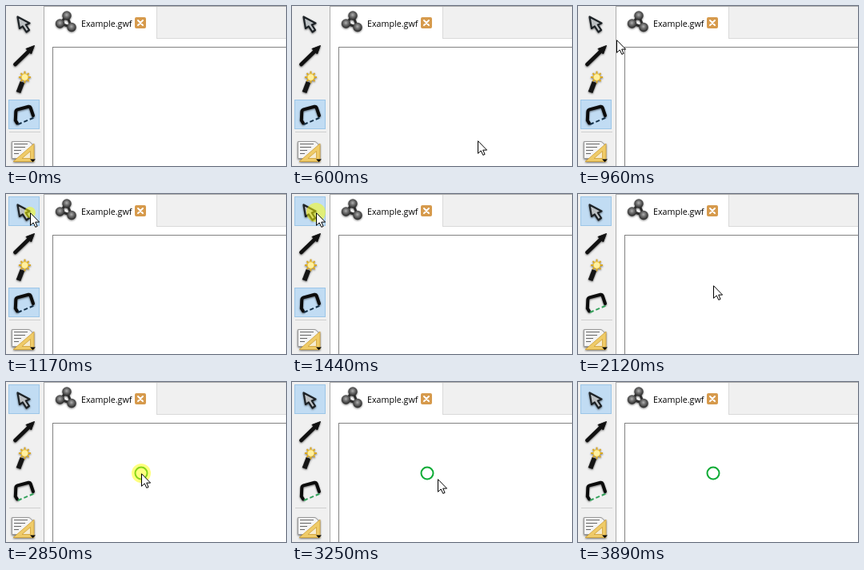
These frames come from a looping animation (350x200 px, 4.49 s). An HTML page:

```html
<!DOCTYPE html>
<html lang="en">
<head>
<meta charset="utf-8">
<title>Placing a node</title>
<style>
  html, body { margin: 0; width: 100%; height: 100%; overflow: hidden; background: #fff; }
  svg { display: block; width: 100%; height: 100%; }
  text { font: 10.7px "Open Sans", "Noto Sans", sans-serif; }
  .icon { filter: drop-shadow(.5px 1px 1.3px rgba(0, 0, 0, .55)); }
  .button { fill: #c1dcf3; stroke: #9cc6e8; }
  .crisp { shape-rendering: crispEdges; }
</style>
</head>
<body>
<svg viewBox="0 0 350 200" preserveAspectRatio="none">
  <defs>
    <radialGradient id="ball" cx=".48" cy=".42" r=".58">
      <stop offset="0" stop-color="#b0b0b0"/>
      <stop offset=".45" stop-color="#6c6c6c"/>
      <stop offset="1" stop-color="#242424"/>
    </radialGradient>
  </defs>

  <!-- window -->
  <g class="crisp">
    <rect width="350" height="200" fill="#fff"/>
    <rect width="47" height="200" fill="#f0f0f0"/>
    <rect x="188" width="162" height="41" fill="#f0f0f0"/>
    <path d="M188.5 0V40.5H350" fill="none" stroke="#d9d9d9"/>
    <path d="M350 .5H47.5V200" fill="none" stroke="#acacac"/>
    <path d="M350 51.5H58.5V200" fill="none" stroke="#828282"/>
    <path d="M4 157.5H43" stroke="#cfcfcf"/>
  </g>

  <!-- tab -->
  <g class="icon">
    <path d="M76 12L67.5 22L82 26.5Z" fill="none" stroke="#2c2c2c" stroke-width="3"/>
    <g fill="url(#ball)">
      <circle cx="76" cy="12" r="5.7"/>
      <circle cx="67.5" cy="22" r="5.7"/>
      <circle cx="82" cy="26.5" r="5.7"/>
    </g>
  </g>
  <text x="94" y="26">Example.gwf</text>
  <rect x="161" y="14" width="14" height="14" rx="2" fill="#d69a4c"/>
  <path d="M165 18l6 6M171 18l-6 6" stroke="#fff" stroke-width="2" stroke-linecap="round"/>

  <!-- toolbar -->
  <rect id="selectButton" class="button crisp" x="3.5" y="3.5" width="38" height="36"/>
  <rect id="bracketButton" class="button crisp" x="3.5" y="117.5" width="38" height="36"/>
  <path class="icon" d="M14.5 13.5L17 28L20.8 25.3L25.5 32.5L29 30L24.8 23.5L29.5 21.5Z"
        fill="#bcc0c3" stroke="#1d2226" stroke-width="2.2" stroke-linejoin="round"/>
  <g class="icon">
    <path d="M11.5 73L28 57" stroke="#111" stroke-width="4.6" stroke-linecap="round"/>
    <path d="M35.5 49.5L31.5 60L25 53.5Z" fill="#111" stroke="#111" stroke-linejoin="round"/>
  </g>
  <g class="icon">
    <path d="M15.5 108L20.5 95" stroke="#151515" stroke-width="6"/>
    <path d="M23.5 81.5V96.5M16 89H31M18.5 84L28.5 94M28.5 84L18.5 94" stroke="#dba821" stroke-width="1.8"/>
    <circle cx="23.5" cy="89" r="4.2" fill="#fff0a0" stroke="#f2cb45"/>
  </g>
  <path class="icon" d="M14 146.5L11.8 143L12.3 132Q12.4 130 14.5 129.3L28 125.8Q30 125.4 30.8 127.5L34 137"
        fill="none" stroke="#0c0c0c" stroke-width="4" stroke-linecap="round"/>
  <path id="dashes" d="M15 148L35 139.5" stroke-width="2" stroke-dasharray="5 3"/>
  <g class="icon">
    <path d="M7.5 169.5H29L33 173V190.5H7.5Z" fill="#f4f4f4" stroke="#999"/>
    <path d="M10 172.5H27M10 176.5H24M10 180.5H19M10 184.5H16" stroke="#666"/>
    <path d="M9 194.5L35 172V194.5Z" fill="#efcb68" stroke="#cf9f35" stroke-width=".8"/>
    <path d="M20 190.5L30.5 181.5V190.5Z" fill="#f6ecd0" stroke="#cf9f35" stroke-width=".8"/>
  </g>
  <path d="M30 191.5H37L33.5 195Z"/>

  <!-- canvas and pointer -->
  <circle id="node" cx="169" cy="114" r="7.5" fill="none" stroke="#0cab35" stroke-width="2"/>
  <circle id="click" fill="#ff0" fill-opacity=".5"/>
  <path id="pointer" d="M.5 .7V16.3L4.2 12.9L6.8 18.4L9.1 17.4L6.7 12.1H11.6Z" fill="#fff" stroke="#000"/>
</svg>
<script>
  const LOOP = 4490;
  const TOOL = [30, 23], SPOT = [169, 114];

  // Eased pointer moves along quadratic curves, advancing in discrete steps.
  const moves = [
    { at: 460, step: 71, count: 10, path: [[257.5, 179], [120, 124], TOOL] },
    { at: 1700, step: 70, count: 7, path: [TOOL, [99.5, 68.5], SPOT] },
    { at: 3180, step: 71, count: 10, path: [SPOT, [239.5, 151.5], [310, 189]] }
  ];
  const clicks = [
    { at: TOOL, radii: [[1170, 7], [1240, 10], [1370, 12], [1500, 0]] },
    { at: SPOT, radii: [[2650, 7], [2720, 10], [2850, 12], [2980, 0]] }
  ];

  const $ = id => document.getElementById(id);
  const [selectButton, bracketButton, dashes, node, click, pointer] =
    ["selectButton", "bracketButton", "dashes", "node", "click", "pointer"].map($);
  const show = (el, on) => el.setAttribute("visibility", on ? "visible" : "hidden");

  function pointerAt(t) {
    const { at, step, count, path: [a, b, c] } = moves.findLast(m => t >= m.at) || moves[0];
    const k = Math.min(count, Math.floor((t - at) / step) + 1);
    const s = (1 - Math.cos(Math.PI * k / count)) / 2;
    return a.map((v, i) => Math.round((1 - s) ** 2 * v + 2 * s * (1 - s) * b[i] + s * s * c[i]));
  }

  function draw(t) {
    show(pointer, t >= 460 && t < 3890);
    pointer.setAttribute("transform", `translate(${pointerAt(t)})`);

    const { at: [x, y], radii } = clicks[t < 2000 ? 0 : 1];
    const phase = radii.findLast(([start]) => t >= start);
    click.setAttribute("cx", x);
    click.setAttribute("cy", y);
    click.setAttribute("r", phase ? phase[1] : 0);

    const switched = t >= 1500;
    show(selectButton, t >= 1030);
    show(bracketButton, !switched);
    dashes.setAttribute("stroke", switched ? "#35a25c" : "#16324a");
    show(node, t >= 2850);
  }

  const start = performance.now();
  function tick() {
    draw((performance.now() - start) % LOOP);
    requestAnimationFrame(tick);
  }
  tick();
</script>
</body>
</html>
```
